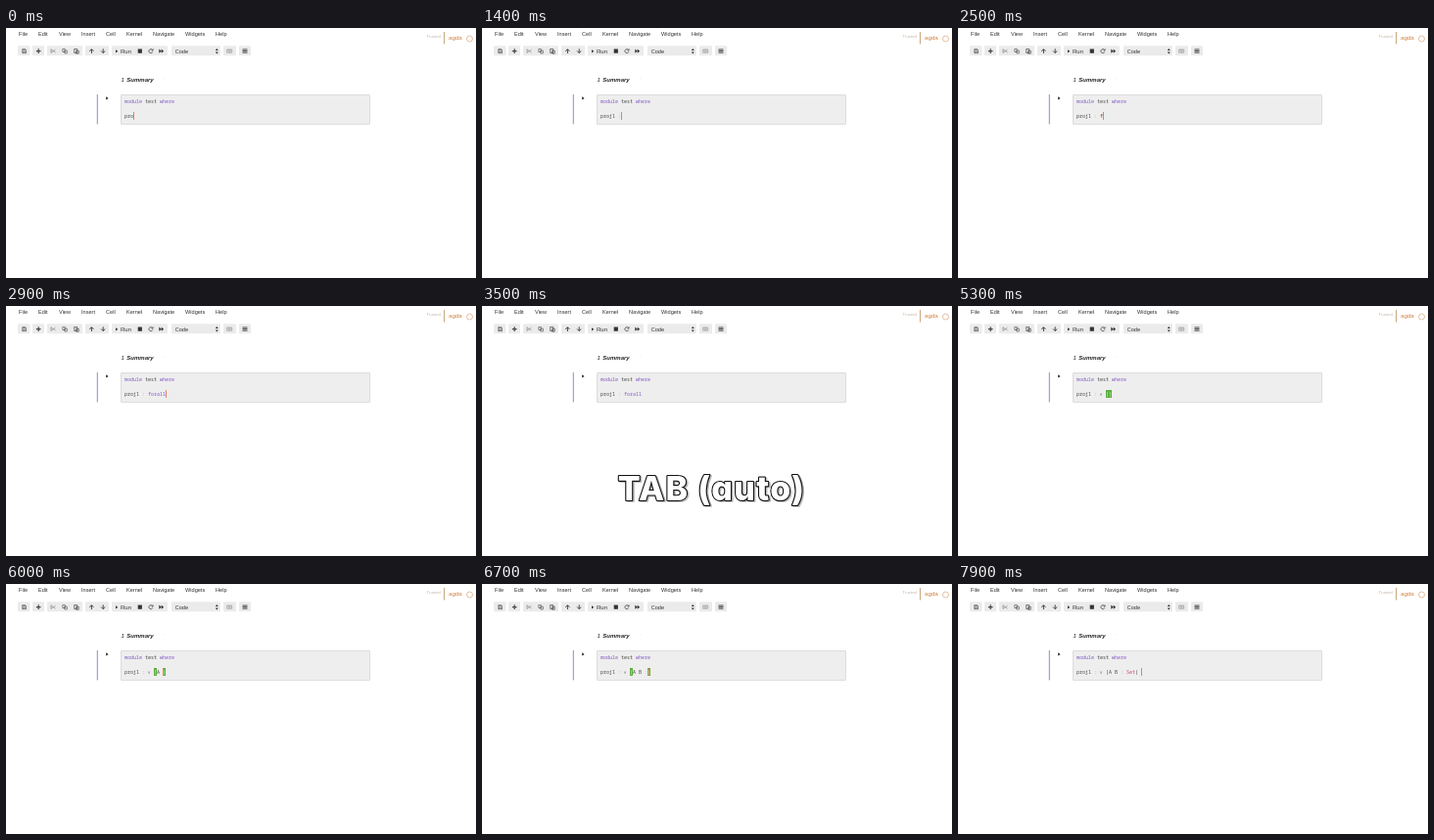
Recreate the animation shown at these times as an HTML page. Size 480 by 256 pixels, loop 8 s.

```html
<!DOCTYPE html>
<html lang="en">
<head>
<meta charset="utf-8">
<style>
  html, body { margin: 0; width: 100%; height: 100%; overflow: hidden; background: #fff; }
  svg { display: block; width: 480px; height: 256px; font-family: "Liberation Sans", sans-serif; }
  text { white-space: pre; }
  .menu { font-size: 5.6px; fill: #333; }
  .code { font: 5px "Noto Sans Mono", "DejaVu Sans Mono", monospace; fill: #444; }
  .keyword { fill: #8159c4; }
  .symbol { fill: #6f6a78; font-size: 3.8px; }
  .colon { fill: #a9a0a0; }
  .type { fill: #d0486c; }
  .bracket { fill: #e0f5d8; }
  .icon { fill: none; stroke: #444; stroke-width: .8; }
  #caption {
    font: 800 34px Inter, sans-serif; font-feature-settings: "cv11"; letter-spacing: 1.3px;
    fill: #fff; stroke: #111; stroke-width: 2.2px; stroke-linejoin: round; paint-order: stroke;
  }
  #caption .shadow { fill: #bbb; stroke: #bbb; }
</style>
</head>
<body>
<svg viewBox="0 0 480 256">
  <g id="menu" class="menu"></g>
  <g id="buttons" fill="#ebebeb"></g>

  <g class="icon">
    <path d="M16.7 21.7h3l.8.8v3.2h-3.8zM17.7 21.7v1.2h1.7v-1.2M17.5 25.5v-1.2h2.2v1.2" stroke-width=".6"/>
    <path d="M33.2 21.3v4.6M30.9 23.6h4.6" stroke-width="1.2"/>
    <path d="M46 22l4.500 3M46 25.200l4.500-3M46 21.600v4" stroke="#888" stroke-width=".7"/>
    <path d="M57.800 21.500h2.500v3h-2.500zM59.800 23h2.500v3h-2.500z" stroke-width=".6"/>
    <path d="M69.700 21.500h3v4h-3zM71.700 23.200h2.500v3h-2.500z" stroke-width=".7"/>
    <path d="M87.400 26v-4.200M85.300 23.800l2.100-2.100 2.100 2.100M99.200 21.300v4.200M97.100 23.500l2.100 2.100 2.100-2.100" stroke-width="1"/>
    <path d="M149.700 22.700a2 2 0 1 0 .1 1.700M150.100 21.300v1.700h-1.700"/>
    <path d="M225.700 22h5v3.200h-5zM226.500 23h3.500M227 24.200h2.500" stroke="#777" stroke-width=".5"/>
    <path d="M241.500 22h5M241.500 23.600h5M241.500 25.200h5" stroke-width="1"/>
  </g>
  <path d="M112 22.200l2.300 1.600-2.300 1.600zM134.700 21.600h4.200v4.200h-4.200zM156.300 21.600l2.400 2.100-2.400 2.100zM158.700 21.600l2.400 2.100-2.400 2.100zM213.800 23l1.500-2 1.500 2zM213.800 24.400l1.500 2 1.500-2z" fill="#333"/>
  <text x="117" y="25.600" font-size="6" fill="#333">Run</text>
  <text x="172.700" y="25.500" class="menu">Code</text>

  <text x="429.500" y="9.900" font-size="4.300" fill="#c4b4a6">Trusted</text>
  <path d="M447.500 4v12.500" stroke="#c9a680"/>
  <text x="452" y="12.100" font-size="6.200" fill="#cf7d3c">agda</text>
  <circle cx="473.500" cy="11" r="3" fill="none" stroke="#dfae84" stroke-width=".8"/>

  <g font-size="6" font-style="italic" fill="#222">
    <text x="117.500" y="55">1</text>
    <text x="123.300" y="55" font-weight="bold">Summary</text>
  </g>
  <circle cx="162" cy="52" r=".5" fill="#ddd"/>

  <path d="M93.300 68v30.500" stroke="#918dB8" stroke-width="1"/>
  <path d="M102.200 70.300l2.400 1.600-2.400 1.600z" fill="#222"/>
  <rect x="117.500" y="68.500" width="254" height="30" rx=".5" fill="#eee" stroke="#dcdcdc"/>
  <text x="121" y="77.200" class="code"><tspan class="keyword">module</tspan> test <tspan class="keyword">where</tspan></text>
  <g id="line" class="code"></g>

  <g id="caption">
    <text x="140.300" y="200.200" class="shadow">TAB (auto)</text>
    <text x="138.800" y="198.700">TAB (auto)</text>
  </g>
</svg>
<script>
const LOOP = 8000, LEFT = 121, CHAR = 3;
const byId = id => document.getElementById(id);

const menu = { File: 13, Edit: 33, View: 54, Insert: 77, Cell: 102, Kernel: 123, Navigate: 150, Widgets: 183, Help: 214 };
byId('menu').innerHTML = Object.entries(menu)
  .map(([name, x]) => `<text x="${x}" y="8.4">${name}</text>`).join('');

const buttons = [[12, 12.5], [27, 12], [42, 36], [81, 24], [108, 57], [169, 50], [222, 13], [238, 12]];
byId('buttons').innerHTML = buttons
  .map(([x, w]) => `<rect x="${x}" y="18.300" width="${w}" height="10" rx=".7"/>`).join('');

// Typed line over time; "|" is the caret
const steps = [
  [0, 'pro|'], [200, 'proj|'], [500, 'proj1|'], [1000, 'proj1 |'],
  [1400, 'proj1 :|'], [1500, 'proj1 : |'], [2000, 'proj1 : '],
  [2500, 'proj1 : f|'], [2600, 'proj1 : fo|'], [2700, 'proj1 : for|'],
  [2800, 'proj1 : fora|'], [2900, 'proj1 : forall|'], [3500, 'proj1 : forall'],
  [3700, 'proj1 : ∀|'], [4100, 'proj1 : ∀ |'], [4400, 'proj1 : ∀ (|)'], [5000, 'proj1 : ∀ ()'],
  [5500, 'proj1 : ∀ (A|)'], [6000, 'proj1 : ∀ (A |)'], [6200, 'proj1 : ∀ (A B|)'],
  [6300, 'proj1 : ∀ (A B |)'], [6700, 'proj1 : ∀ (A B :|)'], [6800, 'proj1 : ∀ (A B : |)'],
  [7000, 'proj1 : ∀ (A B : S|)'], [7200, 'proj1 : ∀ (A B : Se|)'], [7400, 'proj1 : ∀ (A B : Set|)'],
  [7700, 'proj1 : ∀ (A B : Set)|'], [7900, 'proj1 : ∀ (A B : Set) |']
];
const classes = { forall: 'keyword', Set: 'type', '∀': 'symbol', ':': 'colon' };

function drawLine(source, matching) {
  const text = source.replace('|', ''), caret = source.indexOf('|');
  const bar = (index, width, color) =>
    `<rect x="${LEFT + index * CHAR}" y="86" width="${width}" height="8" fill="${color}"/>`;
  let svg = '';
  for (const { 0: token, index } of text.matchAll(/\w+|[^\w\s]/g)) {
    const lit = matching && '()'.includes(token);
    if (lit) svg += bar(index, CHAR, '#5cb040');
    svg += `<text x="${LEFT + index * CHAR}" y="92.200" class="${lit ? 'bracket' : classes[token] || ''}">${token}</text>`;
  }
  if (caret >= 0) svg += bar(caret, 1, '#e8805c');
  byId('line').innerHTML = svg;
}

let shown;
function frame(now) {
  const t = now % LOOP;
  const step = steps.findLast(([start]) => start <= t);
  if (step !== shown) drawLine(step[1], t >= 4400 && t < 7900);
  shown = step;
  byId('caption').style.display = t >= 3500 && t < 5300 ? '' : 'none';
  requestAnimationFrame(frame);
}
requestAnimationFrame(frame);
</script>
</body>
</html>
```
